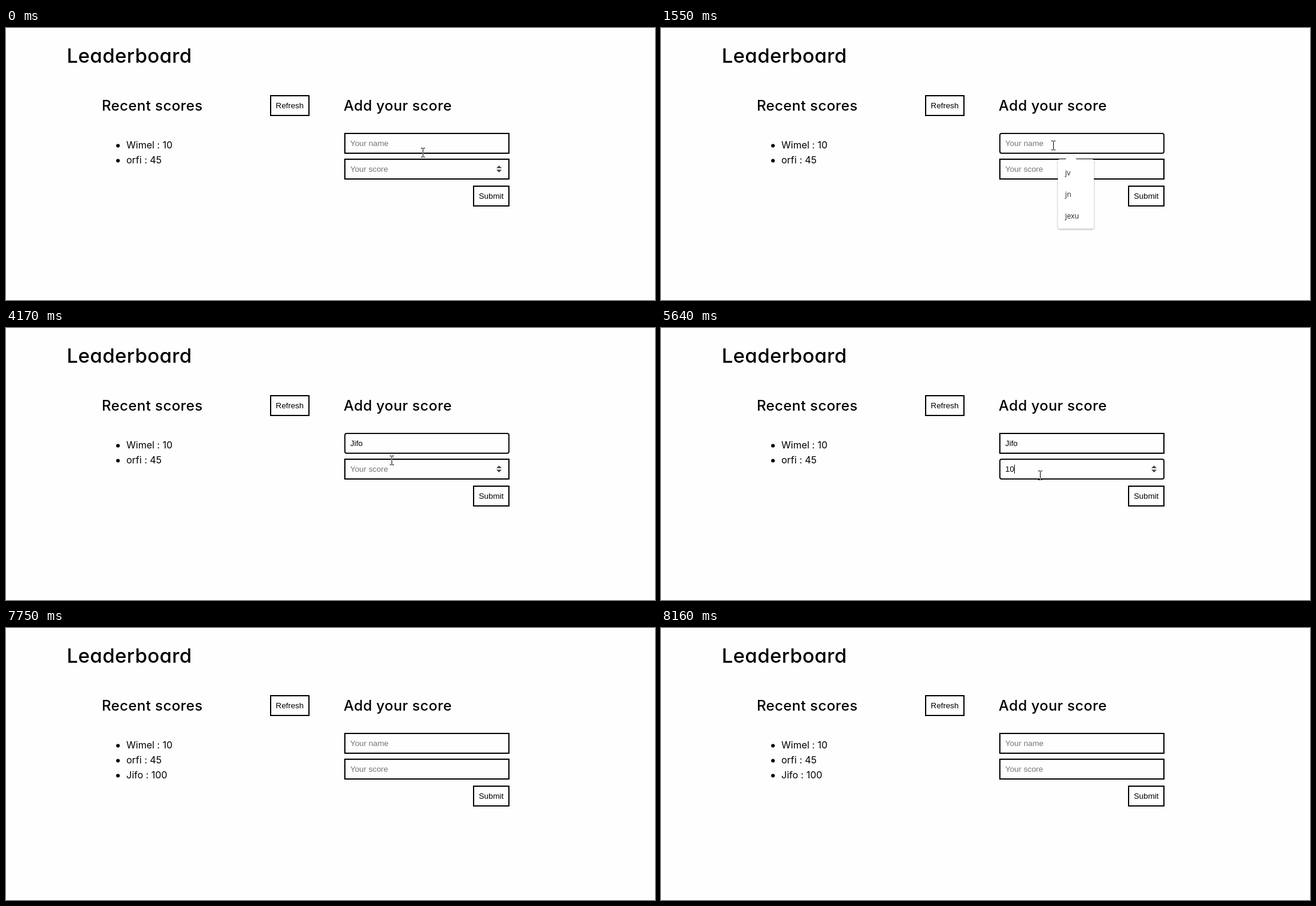
Animation, 1084 px wide and 454 px high, one loop 8770 ms. Source, as an HTML page:

```html
<!DOCTYPE html>
<html lang="en">
<head>
<meta charset="utf-8">
<title>Leaderboard</title>
<style>
  html, body { margin: 0; width: 100%; height: 100%; overflow: hidden; background: #fefefe; }
  svg { display: block; }
  .page { font: 16px Inter, sans-serif; font-feature-settings: "cv11"; }
  .head { font-weight: 500; letter-spacing: .4px; }
  .h1 { font-size: 33px; }
  .h2 { font-size: 24px; }
  .form { font: 13.333px "Liberation Sans", Arial, sans-serif; }
  .box { fill: none; stroke: #000; stroke-width: 2; }
  .popup { font: 12px "Open Sans", sans-serif; fill: #222; }
  .shade { filter: drop-shadow(0 1px 1.5px rgba(0, 0, 0, .35)); }
  .beam { mix-blend-mode: difference; stroke: #fff; fill: none; shape-rendering: crispEdges; }
</style>
</head>
<body>
<svg width="1084" height="454" viewBox="0 0 1084 454">
  <rect width="1084" height="454" fill="#fefefe"/>
  <g class="page">
    <text class="head h1" x="101.5" y="57.5">Leaderboard</text>
    <text class="head h2" x="160" y="138">Recent scores</text>
    <text class="head h2" x="564" y="138">Add your score</text>
    <circle cx="187" cy="196.5" r="3"/><text x="201" y="201">Wimel : 10</text>
    <circle cx="187" cy="221.5" r="3"/><text x="201" y="226">orfi : 45</text>
    <g id="entry"><circle cx="187" cy="246.5" r="3"/><text x="201" y="251">Jifo : 100</text></g>
  </g>
  <g class="form">
    <rect class="box" x="442" y="113" width="64" height="33"/>
    <text x="450.5" y="134">Refresh</text>
    <rect class="box" x="781" y="264" width="59" height="33"/>
    <text x="789.7" y="285">Submit</text>
    <rect class="box" id="nameBox" x="566" y="176" width="274" height="33"/>
    <text id="name" x="575" y="197"></text>
    <rect class="box" id="scoreBox" x="566" y="219" width="274" height="33"/>
    <text id="score" x="575" y="240"></text>
    <path id="spinner" d="M819 234l4.5-4.5 4.5 4.5zM819 236.5h9l-4.5 4.5z" fill="#444"/>
    <rect id="caret" width="1" height="15"/>
  </g>
  <g id="suggest" class="popup">
    <path class="shade" fill="#fff" d="M666 219h10l9-9 9 9h26a3 3 0 0 1 3 3v110a3 3 0 0 1-3 3h-54a3 3 0 0 1-3-3v-110a3 3 0 0 1 3-3z"/>
    <text x="675" y="246">jv</text>
    <text x="675" y="282">jn</text>
    <text x="675" y="318">jexu</text>
  </g>
  <g id="inspect" class="popup">
    <rect width="1084" height="306" fill="rgb(111,168,220)" fill-opacity=".66"/>
    <rect x="-9" y="312" width="138" height="37" rx="6" fill="#e2e2e2"/>
    <path class="shade" fill="#fff" d="M-9 314h10l7-7 7 7h107a3 3 0 0 1 3 3v23a3 3 0 0 1-3 3h-131z"/>
    <text x="-1" y="334" font-weight="700" fill="#881280">html</text>
    <text x="37.5" y="334" fill="#777">1096 × 312.69</text>
  </g>
  <path id="beam" class="beam" d="M-3 -7.5h3m1 0h3M.5 -7v14M-3 7.5h3m1 0h3"/>
  <path id="arrow" d="M.5 .5v16l3.7-3.5 2.5 5.8 2.3-1-2.5-5.6h5z" fill="#fff" stroke="#000"/>
</svg>
<script>
const LOOP = 8770;
const el = id => document.getElementById(id);
const show = (id, on) => el(id).style.display = on ? "" : "none";
const within = (t, a, b) => t >= a && t < b;

// Progress 0..1 in n equal jumps, the first at a and the last at b.
const steps = (t, a, b, n) =>
  t < a ? 0 : Math.min(1, (Math.floor((t - a) / (b - a) * (n - 1) + 1e-6) + 1) / n);
const ease = p => p * p * (3 - 2 * p);

// Pointer moves: start, end, number of jumps, x, y
const moves = [
  [70, 71, 1, 678, 209],
  [230, 620, 7, 656, 200],
  [760, 761, 1, 655, 196],
  [3890, 4500, 8, 633, 246],
  [6650, 7060, 7, 818, 279],
  [7620, 7685, 2, 970, 394],
];

function pointer(t) {
  let x = 696, y = 208;
  for (const [a, b, n, toX, toY] of moves) {
    const p = ease(steps(t, a, b, n));
    x += (toX - x) * p;
    y += (toY - y) * p;
  }
  return [Math.round(x), Math.round(y)];
}

// Text typed so far, one key at each time
const typed = (t, word, keys) => word.slice(0, keys.filter(k => t >= k).length);

function field(id, value, hint) {
  el(id).textContent = value || hint;
  el(id).setAttribute("fill", value ? "#000" : "#757575");
}

function focus(id, on) {
  el(id).setAttribute("rx", on ? 3 : 0);
  el(id).style.stroke = on ? "#101010" : "#000";
}

function draw(t) {
  const sent = t >= 7280;
  const name = sent ? "" : typed(t, "Jifo", [2030, 2302, 2640, 3160]);
  const score = sent ? "" : typed(t, "100", [5110, 5640, 5840]);
  const onName = within(t, 760, 4326), onScore = within(t, 4326, 7280);

  field("name", name, "Your name");
  field("score", score, "Your score");
  focus("nameBox", onName);
  focus("scoreBox", onScore);
  show("spinner", t < 70 || within(t, 4151, 7280));
  show("entry", t >= 7410);
  show("inspect", within(t, 7960, 8160));
  el("suggest").style.opacity = steps(t, 842, 1090, 4) - steps(t, 2030, 2370, 6);

  const blinkOff = [[1550, 2030], [3690, 4326], [4840, 5110], [6380, 6910]];
  show("caret", (onName || onScore) && !blinkOff.some(([a, b]) => within(t, a, b)));
  const value = onName ? name : score;
  const width = value ? el(onName ? "name" : "score").getComputedTextLength() : 0;
  el("caret").setAttribute("x", 575 + Math.round(width));
  el("caret").setAttribute("y", onName ? 185 : 228);

  const [x, y] = pointer(t);
  const overText = y < 254;
  for (const id of ["beam", "arrow"]) el(id).setAttribute("transform", `translate(${x} ${y})`);
  show("beam", overText);
  show("arrow", !overText && t < 7750);
}

function tick() {
  draw(performance.now() % LOOP);
  requestAnimationFrame(tick);
}
tick();
</script>
</body>
</html>
```
